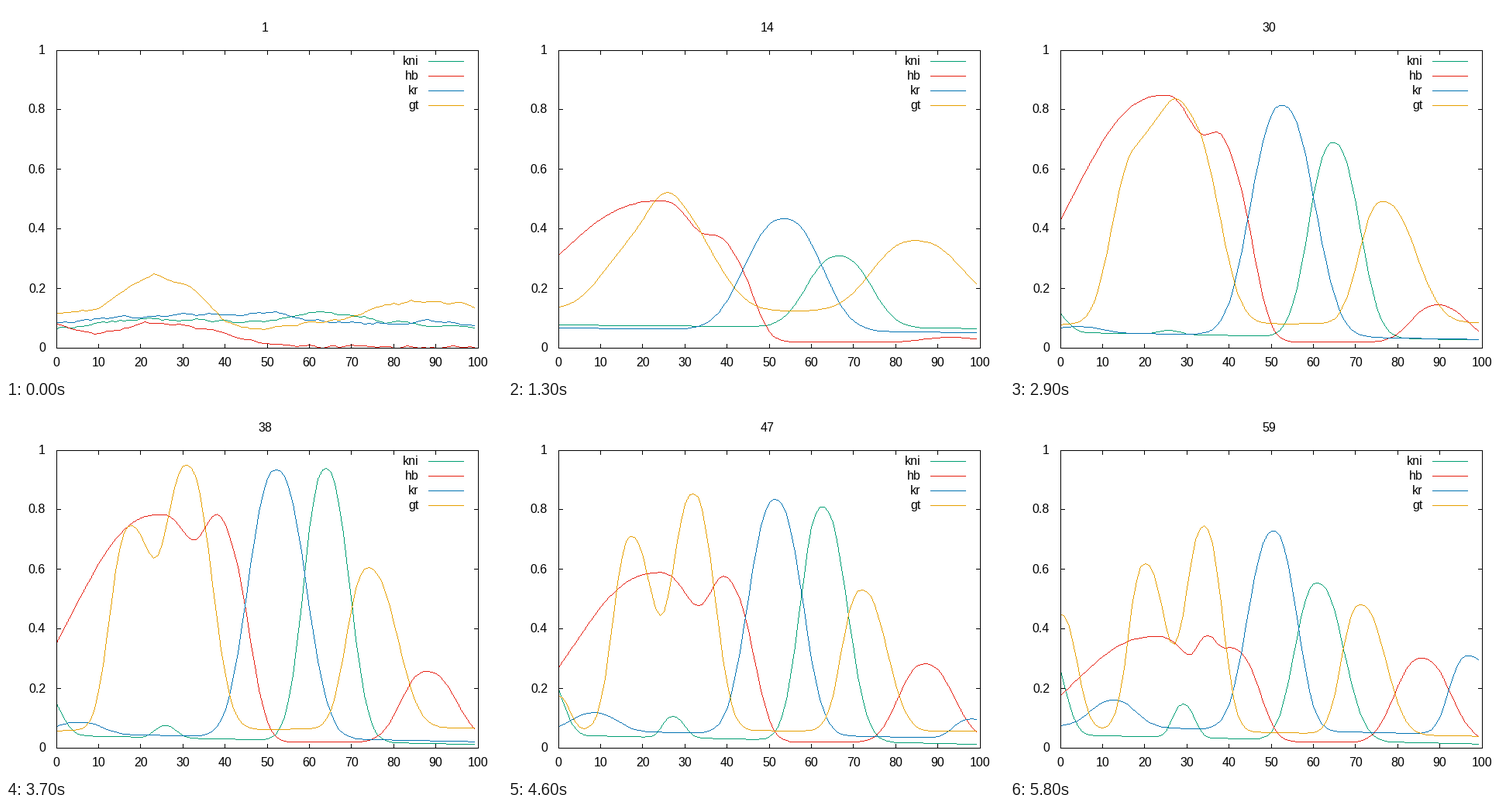
A matplotlib script for the animation above (5900 ms loop, 640x480 px).

```python
import numpy as np
import matplotlib.pyplot as plt
from matplotlib.animation import FuncAnimation
from matplotlib.colors import to_rgb

W, H, DPI = 640, 480, 100
FRAMES, STEP_MS = 59, 100
LEFT, RIGHT, TOP, BOTTOM = 65, 609, 57, 441
PX = 72 / DPI  # one pixel in points
FIRST, LAST = 14, 59
KEYS = (14, 22, 30, 38, 47, 59)
GENES = {"kni": "#009e73", "hb": "#e51e10", "kr": "#0072b2", "gt": "#e69f00"}
POS = np.arange(100)
rng = np.random.default_rng(4)


def path(*values):
    """Value over time: six values sit on KEYS, fewer are spread evenly."""
    times = KEYS if len(values) == len(KEYS) else np.linspace(FIRST, LAST, len(values))
    return lambda n: np.interp(n, times, values)


def late(since, height):
    """Height that grows from zero after a given step."""
    return lambda n: np.interp(n, (since, LAST), (0, height))


def base(left, right):
    return lambda n: left(n) + (right(n) - left(n)) * POS / 99


def bump(center, height, wl, wr):
    """Flat-topped bell with its own width on each side."""
    def shape(n):
        d = POS - center(n)
        return height(n) * np.exp(-np.abs(d / np.where(d < 0, wl(n), wr(n))) ** 2.4)
    return shape


def noisy(xs, ys):
    """Rough first profile through a few points."""
    noise = np.convolve(rng.normal(0, 0.005, len(POS) + 2), np.ones(3) / 3, "valid")
    return np.maximum(np.interp(POS, xs, ys) + noise, 0)


start = {
    "kni": noisy((0, 20, 48, 63, 80, 99), (.065, .1, .088, .122, .088, .068)),
    "hb": noisy((0, 9, 21, 33, 48, 60, 99), (.078, .046, .08, .074, .018, .005, .002)),
    "kr": noisy((0, 32, 45, 51, 60, 78, 93, 99), (.088, .115, .108, .12, .092, .08, .09, .072)),
    "gt": noisy((0, 10, 18, 23, 32, 40, 47, 68, 80, 93, 99),
                (.117, .135, .212, .248, .205, .085, .062, .1, .157, .157, .14)),
}

parts = {
    "kni": [
        base(path(.078, .043, .045), path(.066, .012, .014)),
        bump(path(-3), late(18, .29), path(5), path(5)),
        bump(path(26, 25.5, 29), late(26, .112), path(3.2), path(3.5)),
        bump(path(66.5, 64, 60.8), path(.24, .36, .655, .918, .786, .53),
             path(9.8, 6.7, 6.8), path(9.8, 7.2, 8.2)),
    ],
    "hb": [
        base(path(.02), path(.02)),
        bump(path(24.5, 25, 23), path(.475, .6, .83, .765, .57, .355),
             path(33, 27, 25), path(13)),
        bump(path(41, 40.5, 42), path(.23, .25, .45, .55, .45, .28), path(6.5), path(6.8)),
        bump(path(34.5), late(47, .12), path(3), path(3)),
        bump(path(92.5, 88, 85.5), path(.016, .042, .125, .238, .263, .283),
             path(8), path(9)),
    ],
    "kr": [
        base(path(.068, .048, .075), path(.052, .02, .045)),
        bump(path(3, 5, 12.5), late(22, .09), path(7), path(7)),
        bump(path(53.5, 52.2, 50.5), path(.375, .53, .775, .9, .79, .67),
             path(12, 8.6, 7.8), path(11.5, 9.2, 7)),
        bump(path(102, 96.5), late(43, .265), path(5.5), path(9)),
    ],
    "gt": [
        base(path(.13, .058, .065), path(.12, .07, .04)),
        bump(path(0), late(42, .385), path(5), path(2, 2, 5)),
        bump(path(20, 18.4, 16.5, 20), path(.22, .38, .58, .68, .65, .56),
             path(12, 6, 5), path(12, 7, 6.2)),
        bump(path(29, 30.5, 31.3, 34), path(.23, .38, .66, .885, .795, .69),
             path(9, 7, 5.8), path(12, 7.6, 5.5)),
        bump(path(84.5, 76.5, 72, 71), path(.24, .28, .41, .54, .475, .435),
             path(13, 7, 6, 5.6), path(15, 10.5, 7.8, 7.8)),
    ],
}


def profile(gene, n):
    """Levels of one gene at step n."""
    levels = sum(part(max(n, FIRST)) for part in parts[gene])
    mix = min((n - 1) / (FIRST - 1), 1)
    return start[gene] * (1 - mix) + levels * mix


def px(x):
    return LEFT + (RIGHT - LEFT) * x / 100


def py(y):
    return BOTTOM - (BOTTOM - TOP) * y


def trace(canvas, levels, color):
    """Draw a hard-edged line one pixel wide."""
    xs, ys = np.rint(px(POS)).astype(int), np.rint(py(levels)).astype(int)
    for x0, y0, x1, y1 in zip(xs, ys, xs[1:], ys[1:]):
        count = max(x1 - x0, abs(y1 - y0)) + 1
        rows = np.rint(np.linspace(y0, y1, count)).astype(int)
        cols = np.rint(np.linspace(x0, x1, count)).astype(int)
        canvas[rows, cols] = color


plt.rcParams["font.family"] = "Liberation Sans"
fig = plt.figure(figsize=(W / DPI, H / DPI), dpi=DPI, facecolor="white")
picture = fig.figimage(np.full((H, W, 3), 255, np.uint8), zorder=-1)
ax = fig.add_axes([0, 0, 1, 1])
ax.set(xlim=(0, W), ylim=(H, 0))
ax.axis("off")


def line(xs, ys, color="black"):
    ax.plot(xs, ys, color=color, lw=PX, snap=True)


def label(x, y, text, ha="center"):
    return ax.text(x, y, text, ha=ha, va="baseline", size=16 * PX, color="black")


line([LEFT, RIGHT, RIGHT, LEFT, LEFT], [TOP, TOP, BOTTOM, BOTTOM, TOP])
for v in range(0, 101, 10):
    x = int(px(v))
    line([x, x], [BOTTOM, BOTTOM - 5])
    line([x, x], [TOP, TOP + 5])
    label(px(v), 465, str(v))
for v in np.arange(6) / 5:
    y = int(py(v))
    line([LEFT, LEFT + 5], [y, y])
    line([RIGHT, RIGHT - 5], [y, y])
    label(51, y + 5.5, f"{v:g}", "right")
for i, (gene, color) in enumerate(GENES.items()):
    y = 71 + 19 * i
    label(532.5, y + 5, gene, "right")
    line([545, 590], [y, y], color)

title = label(334.6, 33, "")
inks = {gene: np.rint(255 * np.array(to_rgb(color))) for gene, color in GENES.items()}


def update(i):
    n = i + 1
    title.set_text(str(n))
    canvas = np.full((H, W, 3), 255, np.uint8)
    for gene, ink in inks.items():
        trace(canvas, profile(gene, n), ink)
    picture.set_data(canvas)
    return [picture, title]


anim = FuncAnimation(fig, update, frames=FRAMES, interval=STEP_MS, repeat=True,
                     repeat_delay=0, init_func=lambda: update(0))
plt.show()
```
